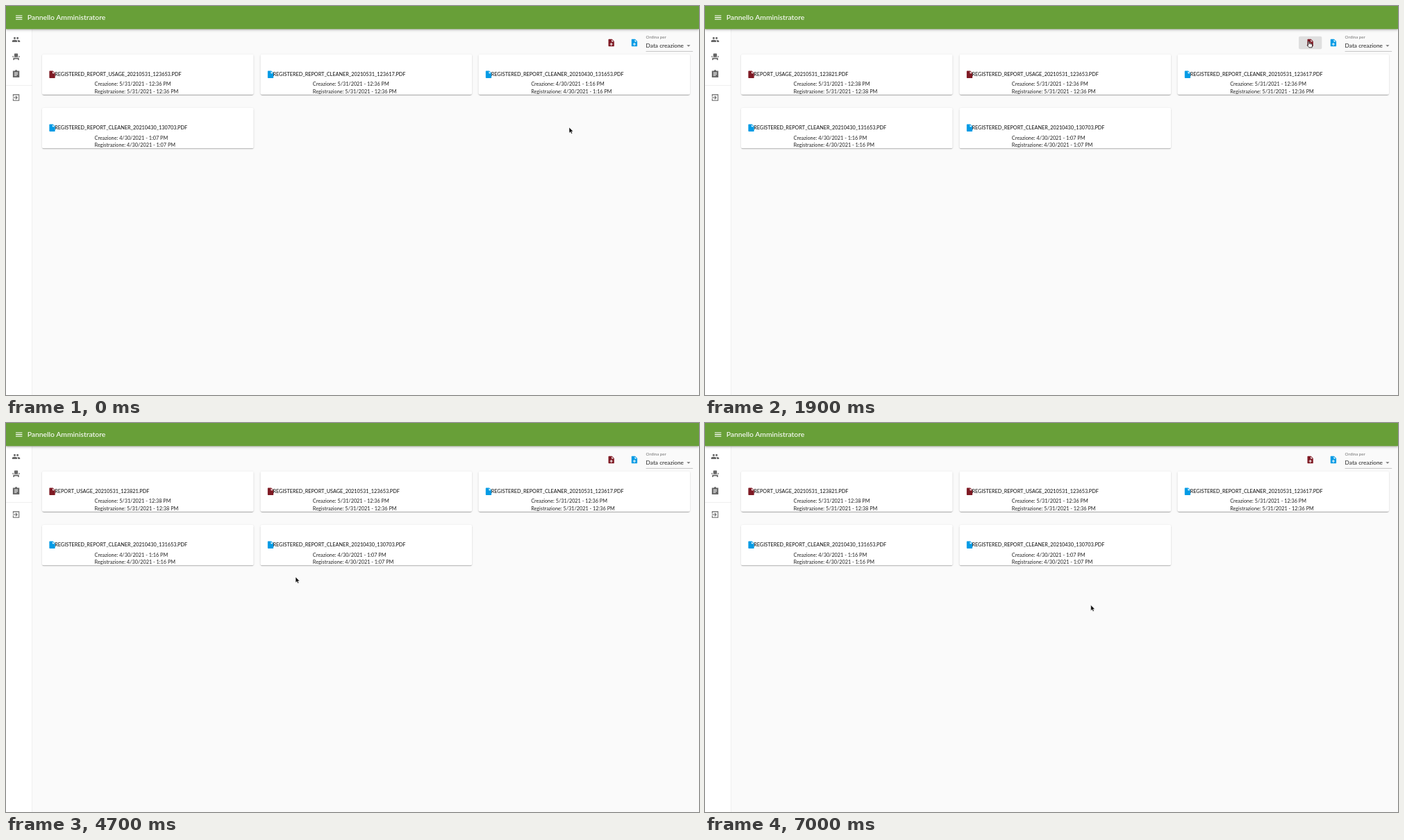
An HTML page for the animation above (8 s loop, 998 by 561 pixels).

```html
<!DOCTYPE html>
<html lang="it">
<head>
<meta charset="utf-8">
<title>Pannello Amministratore</title>
<style>
html, body { margin: 0; width: 100%; height: 100%; overflow: hidden; background: #fafafa; }
/* laid out on a 1920 px wide screen, shown at 998 px */
#page { position: absolute; width: 1920px; height: 1080px; transform: scale(.51979); transform-origin: 0 0;
  font-family: Lato, Carlito, sans-serif; color: #212121; }
#page * { position: absolute; white-space: pre; }
#pointer { position: absolute; left: 0; top: 0; overflow: visible; }
.bar { left: 0; top: 0; width: 1920px; height: 64px; background: #689f38;
  box-shadow: 0 2px 4px -1px rgba(0,0,0,.2), 0 4px 5px rgba(0,0,0,.14), 0 1px 10px rgba(0,0,0,.12); }
.side { left: 0; top: 64px; width: 72px; height: 1016px; background: #fff; border-right: 1px solid #e0e0e0; }
.rule { left: 0; top: 220px; width: 72px; height: 1px; background: #e0e0e0; }
.line { left: 1773px; top: 125px; width: 130px; height: 1px; background: #949494; }
.caret { left: 1886px; top: 108px; border: 5px solid transparent; border-top-color: #757575; }
.card { width: 586px; height: 112px; border-radius: 4px; background: #fff;
  box-shadow: 0 3px 1px -2px rgba(0,0,0,.2), 0 2px 2px rgba(0,0,0,.14), 0 1px 5px rgba(0,0,0,.12); }
#hover { left: 1645px; top: 84px; width: 64px; height: 36px; border-radius: 4px; background: #000; }
</style>
</head>
<body>
<div id="page"></div>
<svg id="pointer" width="12" height="12">
  <path id="arrow" d="M0 0V8.2L1.9 6.5 3.2 9.3 4.7 8.6 3.4 5.9H5.9Z" fill="#111" stroke="#fff" stroke-width=".5"/>
  <path id="hand" d="M.7.9Q1.4-.1 2.2.9V3.7L5.9 4.5Q6.8 4.8 6.7 5.8L6.1 9.3H2L-.7 6.3Q-.9 5.2.7 6Z" fill="#fff" stroke="#111" stroke-width=".8"/>
</svg>
<script>
const RED = '#7f1a24', BLUE = '#039be5', GREY = '#666';
const SHEET = 'M5 2h9l6 6v13l-1 1H5l-1-1V3zM13 9V3.5L18.5 9z';
const ICONS = {
  menu: 'M3 6h18v2H3zM3 11h18v2H3zM3 16h18v2H3z',
  people: 'M5 8a3 3 0 0 1 6 0 3 3 0 0 1-6 0zM13 8a3 3 0 0 1 6 0 3 3 0 0 1-6 0zM1 19v-2.5q0-3 7-3.5 7 .5 7 3.5V19zM17 19v-2.5q0-2-2-3.4 8-.3 8 3.4V19z',
  seat: 'M4 15h16v6h-3v-3H7v3H4zM19 10h3v3h-3zM2 10h3v3H2zM7 13V4l1-1h8l1 1v9z',
  tasks: 'M3 3h6a3 3 0 0 1 6 0h6v18H3zM7 7h10v2H7zM7 11h10v2H7zM7 15h7v2H7z',
  exit: 'M3 9V3h18v18H3v-6h2v4h14V5H5v4zM3 11h9.7L10 8.4 11.5 7l5 5-5 5-1.5-1.4 2.7-2.6H3z',
  file: SHEET,
  add: SHEET + 'M11 12h2v3h3v2h-3v3h-2v-3H8v-2h3z'
};

const icon = (name, x, y, fill) =>
  `<svg width="24" height="24" style="left:${x - 12}px;top:${y - 12}px" fill="${fill}" fill-rule="evenodd"><path d="${ICONS[name]}"/></svg>`;

// y is the baseline
const text = (s, x, y, size, style = '') =>
  `<span style="left:${x}px;top:${y - Math.round(size * .987)}px;font-size:${size}px;${style}">${s}</span>`;

function formatDate(stamp) {
  const [, y, mo, d, h, mi] = stamp.match(/(....)(..)(..)_(..)(..)/);
  return `${+mo}/${+d}/${y} - ${h % 12 || 12}:${mi} PM`;
}

function card([kind, stamp], i) {
  const x = 100 + i % 3 * 604.6, y = 134 + Math.floor(i / 3) * 148.7;
  const date = formatDate(stamp);
  return `<div class="card" style="left:${x}px;top:${y}px">
    ${icon('file', 28, 55.5, kind.endsWith('USAGE') ? RED : BLUE)}
    ${text(`${kind}_${stamp}.PDF`, 35, 60, 14, 'font-weight:500')}
    ${text('Creazione: ' + date, 145.5, 88, 14)}
    ${text('Registrazione: ' + date, 145.5, 108, 14)}</div>`;
}

const CLEANER = 'REGISTERED_REPORT_CLEANER';
const before = [
  ['REGISTERED_REPORT_USAGE', '20210531_123653'],
  [CLEANER, '20210531_123617'],
  [CLEANER, '20210430_131653'],
  [CLEANER, '20210430_130703']
];
const after = [['REPORT_USAGE', '20210531_123821'], ...before];
const list = (id, files) => `<div id="${id}">${files.map(card).join('')}</div>`;

page.innerHTML = `
  <div class="side"></div><div class="rule"></div><div class="bar"></div>
  ${icon('menu', 36, 32, '#fff')}
  ${text('Pannello Amministratore', 59, 39, 20, 'color:#fff;font-weight:500')}
  ${['people', 'seat', 'tasks'].map((name, i) => icon(name, 28, 93 + i * 48, GREY)).join('')}
  ${icon('exit', 28, 254, GREY)}
  <div id="hover"></div>
  ${icon('add', 1677, 102, RED)}
  ${icon('add', 1741, 102, BLUE)}
  ${text('Ordina per', 1773, 90, 12, 'color:#757575')}
  ${text('Data creazione', 1773, 115, 16)}
  <div class="caret"></div><div class="line"></div>
  ${list('oldList', before)}
  ${list('newList', after)}`;

const ramp = (t, from, to) => {
  const u = Math.min(1, Math.max(0, (t - from) / (to - from)));
  return u * u * (3 - 2 * u);
};

// pointer moves: start, end, and where it comes to rest
const home = { x: 811, y: 175 };
const moves = [
  { from: 700, to: 1400, x: 868, y: 50.5 },
  { from: 1900, to: 2400, x: 633, y: 178 },
  { from: 2700, to: 3000, x: 411.6, y: 195 },
  { from: 3000, to: 3400, x: 371, y: 195 },
  { from: 3500, to: 4200, x: 414, y: 193 },
  { from: 4200, to: 4700, x: 417, y: 222 },
  { from: 5000, to: 5600, x: 443.7, y: 135 },
  { from: 6100, to: 7000, x: 555.6, y: 262.5 }
];

function pointerAt(t) {
  let { x, y } = home;
  for (const m of moves) {
    const u = ramp(t, m.from, m.to);
    x += (m.x - x) * u;
    y += (m.y - y) * u;
  }
  return { x, y };
}

const show = (el, on) => { el.style.visibility = on ? 'visible' : 'hidden'; };

function draw(now) {
  const t = Math.floor(now % 8000 / 100) * 100;
  const { x, y } = pointerAt(t);
  const over = x > 855 && x < 888 && y > 43 && y < 62;
  pointer.style.transform = `translate(${x}px, ${y}px)`;
  show(hand, over);
  show(arrow, !over);
  show(oldList, t < 1800);
  show(newList, t >= 1800);
  hover.style.opacity = (.04 * ramp(t, 1300, 1400) + .07 * ramp(t, 1500, 1900)) * (1 - ramp(t, 2000, 2300));
}

const start = performance.now();
function loop() {
  draw(performance.now() - start);
  requestAnimationFrame(loop);
}
loop();
</script>
</body>
</html>
```
